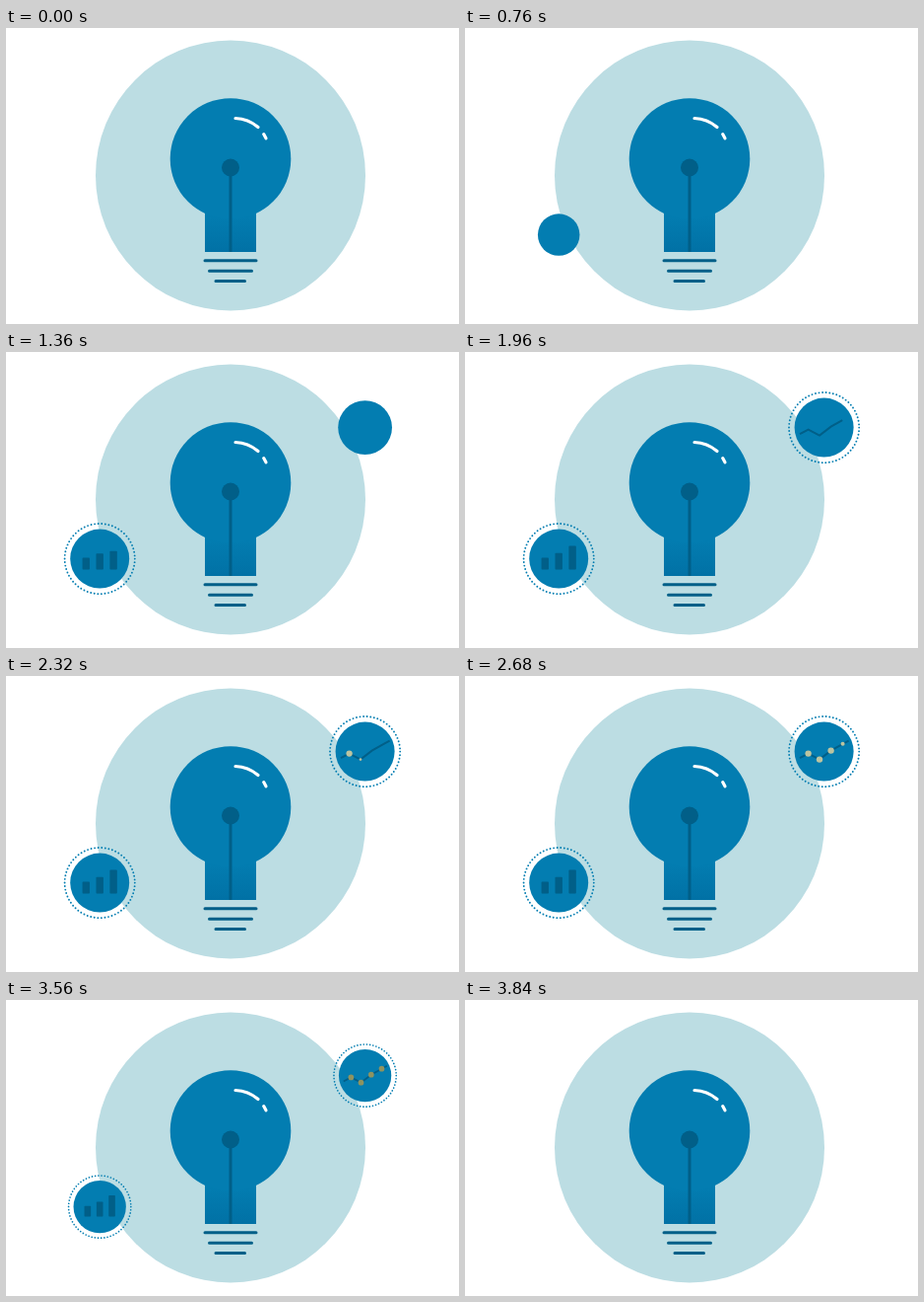
An HTML page for the animation above (3880 ms loop, 460x300 px).

```html
<!DOCTYPE html>
<html lang="en">
<head>
<meta charset="utf-8">
<title>Light bulb</title>
<style>
html, body { margin: 0; width: 100%; height: 100%; overflow: hidden; background: #fff; }
svg { display: block; width: 460px; height: 300px; }
</style>
</head>
<body>
<svg viewBox="0 0 460 300">
  <defs>
    <linearGradient id="shade" x1="0" y1="0" x2="0" y2="1">
      <stop offset="0.2" stop-color="#037db1"/>
      <stop offset="1" stop-color="#0171a5"/>
    </linearGradient>
  </defs>
  <circle cx="228" cy="149.5" r="137" fill="#bcdde3"/>
  <rect x="202" y="180" width="52" height="47" fill="url(#shade)"/>
  <circle cx="228" cy="132.5" r="61.3" fill="#037db1"/>
  <g fill="none" stroke="#015f88" stroke-width="3">
    <path d="M228 141V227"/>
    <path d="M202 235.8H254M206.5 246.2H249.5M213 256.6H242.5" stroke-linecap="round"/>
  </g>
  <circle cx="228" cy="141.5" r="9" fill="#015f88"/>
  <path d="M233 91.5Q246 92 256 100.5M261.7 107.6L264 111.8" fill="none" stroke="#fff" stroke-width="3.2" stroke-linecap="round"/>
  <g id="left"></g>
  <g id="right"></g>
</svg>
<script>
const LOOP = 3880, STEP = 40;
const DISC = 30, RING = 35.6, RING_DOTS = 62;
const BLUE = '#037db1', DARK = '#015f88';

const clamp = v => Math.max(0, Math.min(1, v));
const span = (t, start, length) => clamp((t - start) / length);
const easeOut = p => 1 - (1 - p) * (1 - p);
const mix = (a, b, p) => a.map((v, i) => Math.round(v + (b[i] - v) * p));

function add(parent, tag, attrs) {
  const el = document.createElementNS('http://www.w3.org/2000/svg', tag);
  set(el, attrs);
  parent.append(el);
  return el;
}
function set(el, attrs) {
  for (const k in attrs) el.setAttribute(k, attrs[k]);
}

function makeBadge(id, x, y, start) {
  const root = document.getElementById(id);
  const disc = add(root, 'circle', { fill: BLUE });
  const ring = add(root, 'circle', {
    fill: 'none', stroke: BLUE, 'stroke-width': 1.9, 'stroke-linecap': 'round'
  });
  function update(t) {
    const out = span(t, 3440, 360);
    const scale = 1 - out * out;
    const shown = t >= start && scale > 0;
    root.setAttribute('visibility', shown ? 'visible' : 'hidden');
    root.setAttribute('transform', `translate(${x} ${y}) scale(${scale})`);
    disc.setAttribute('r', DISC * easeOut(span(t, start, 400)));
    const grow = easeOut(span(t, start + 340, 160));
    const r = DISC - 2 + (RING - DISC + 2) * grow;
    set(ring, {
      r, opacity: grow > 0 ? 1 : 0,
      'stroke-dasharray': `0 ${2 * Math.PI * r / RING_DOTS}`
    });
  }
  return { root, update };
}

const left = makeBadge('left', 95.2, 209.6, 576);
const right = makeBadge('right', 364.6, 76.6, 1078);

const bars = [12, 16.8, 24].map((height, i) => ({
  height, start: 1060 + i * 80,
  el: add(left.root, 'rect', { x: -17.6 + i * 13.9, width: 7.4, rx: 0.8, fill: DARK })
}));

const points = [[-24.6, 6.6], [-16, 2], [-4.6, 8], [7, -1], [19, -7.8], [25, -11]];
const line = add(right.root, 'polyline', {
  points: points.join(' '), pathLength: 1, fill: 'none', stroke: DARK, 'stroke-width': 2
});
const dots = points.slice(1, 5).map(([cx, cy]) => add(right.root, 'circle', { cx, cy }));

function render(t) {
  left.update(t);
  right.update(t);
  for (const b of bars) {
    const h = b.height * easeOut(span(t, b.start, 260));
    set(b.el, { y: 11 - h, height: h });
  }
  const drawn = span(t, 1540, 480);
  set(line, { 'stroke-dasharray': `${drawn} 2`, opacity: drawn > 0 ? 1 : 0 });
  const tone = mix([188, 196, 160], [142, 147, 96], span(t, 2760, 320));
  dots.forEach((dot, i) => set(dot, {
    r: 3.2 * easeOut(span(t, 2100 + i * 160, 250)),
    fill: `rgb(${tone})`
  }));
}

const begin = performance.now();
function frame() {
  const t = (performance.now() - begin) % LOOP;
  render(Math.floor(t / STEP) * STEP);
  requestAnimationFrame(frame);
}
frame();
</script>
</body>
</html>
```
